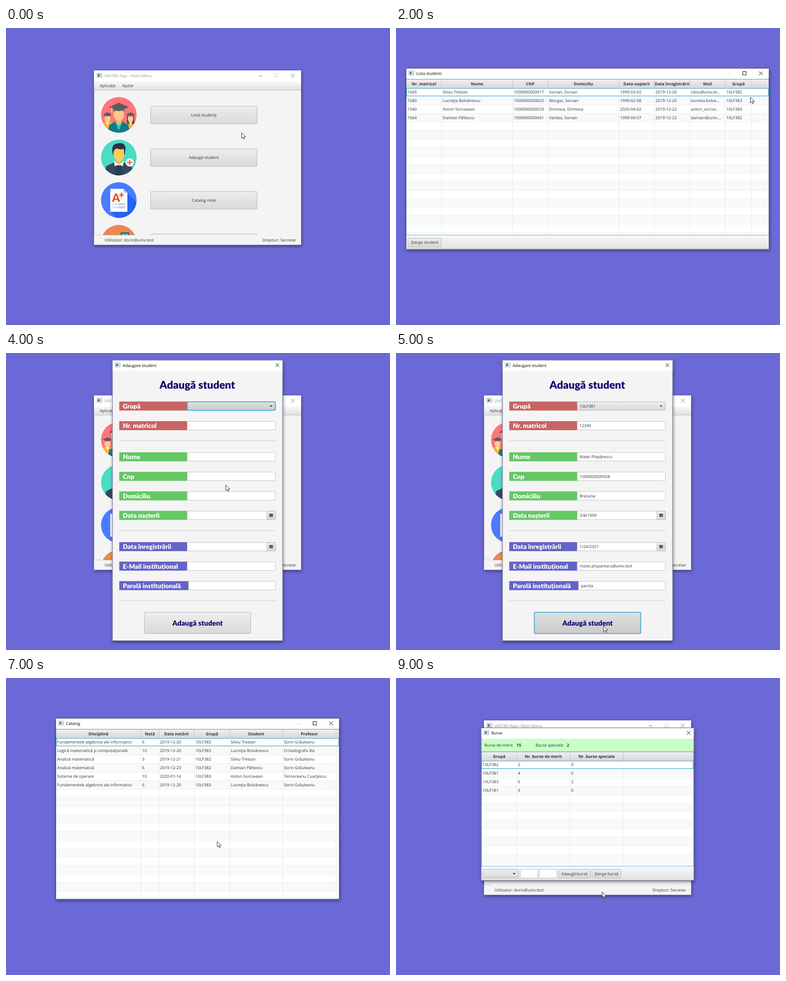
Recreate the animation shown at these times as an HTML page. Size 851 px wide and 658 px high, loop 10000 ms.

```html
<!DOCTYPE html>
<html lang="ro">
<head>
<meta charset="utf-8">
<title>Main Menu</title>
<style>
  html, body { margin: 0; width: 100%; height: 100%; overflow: hidden; background: #6b69d6; }
  svg { display: block; }
  text { font: 9px "Open Sans", "Noto Sans", sans-serif; fill: #333; text-rendering: geometricPrecision; white-space: pre; }
  .bold { font-weight: 700; }
  .mid { text-anchor: middle; }
  .end { text-anchor: end; }
  .lato { font-family: Lato, "Open Sans", sans-serif; font-weight: 900; }
  .label { font-size: 14.13px; fill: #fff; }
  .navy { fill: #10056e; }
  .shadow { filter: drop-shadow(1.5px 3px 3.5px rgba(0, 0, 0, .45)); }
</style>
</head>
<body>
<svg width="851" height="658" viewBox="0 0 851 658">
  <defs>
    <linearGradient id="button" x2="0" y2="1"><stop stop-color="#eeeeee"/><stop offset="1" stop-color="#d9d9d9"/></linearGradient>
    <linearGradient id="hover" x2="0" y2="1"><stop stop-color="#e0e0e0"/><stop offset="1" stop-color="#cacaca"/></linearGradient>
    <linearGradient id="bar" x2="0" y2="1"><stop stop-color="#f8f8f8"/><stop offset="1" stop-color="#e2e2e2"/></linearGradient>
    <linearGradient id="header" x2="0" y2="1"><stop stop-color="#f0f0f0"/><stop offset="1" stop-color="#d8d8d8"/></linearGradient>
    <clipPath id="viewport"><rect x="195" y="138" width="459" height="321"/></clipPath>
    <clipPath id="disc"><circle r="39.5"/></clipPath>
  </defs>
  <g id="stage"></g>
</svg>
<script>
const BLUE = '#1fa3d0';
const ROW = 18.85;

const rect = (x, y, w, h, fill, attrs = '') =>
  `<rect x="${x}" y="${y}" width="${w}" height="${h}" fill="${fill}" ${attrs}/>`;
const path = (d, fill, attrs = '') => `<path d="${d}" fill="${fill}" ${attrs}/>`;
const line = (d, color, width = 1) => path(d, 'none', `stroke="${color}" stroke-width="${width}"`);
const ellipse = (x, y, rx, ry, fill) => `<ellipse cx="${x}" cy="${y}" rx="${rx}" ry="${ry}" fill="${fill}"/>`;
const text = (x, y, s, cls = '', attrs = '') => `<text x="${x}" y="${y}" class="${cls}" ${attrs}>${s}</text>`;
const group = (attrs, ...parts) => `<g ${attrs}>${parts.join('')}</g>`;

function button(x, y, w, h, label, active = false, cls = '', size = 9) {
  const edge = active ? `stroke="${BLUE}" stroke-width="1.5"` : 'stroke="#b5b5b5"';
  return rect(x, y, w, h, `url(#${active ? 'hover' : 'button'})`, `rx="2" ${edge}`) +
    text(x + w / 2, y + h / 2 + size * .36, label, 'mid ' + cls, `style="font-size:${size}px"`);
}

const field = (x, y, w, h, value = '') =>
  rect(x, y, w, h, '#fff', 'rx="1" stroke="#c0c0c0"') + text(x + 5.5, y + h / 2 + 3.2, value);

const combo = (x, y, w, h, value, active) =>
  button(x, y, w, h, '', active) + text(x + 5.5, y + h / 2 + 3.2, value) +
  path(`M${x + w - 12.5} ${y + h / 2 - 1.5}h6l-3 3.5z`, '#333');

const cursor = (x, y) =>
  path('M0 0V12.5L3 9.8L5 14.3L7 13.4L5.1 9.1H9Z', '#fff', `stroke="#111" stroke-width=".9" transform="translate(${x} ${y})"`);

// Window frame; controls: 'full' shows minimise and maximise, 'close' only the cross.
function frame(x, y, right, bottom, title, { controls = 'close', active = true, min = '#000', max = '#000' }, ...body) {
  const ink = active ? '#000' : '#999';
  const cy = y + 11.5;
  const cross = right - (controls === 'full' ? 18.5 : 12);
  let s = group('class="shadow"', rect(x, y, right - x, bottom - y, '#f4f4f4'));
  s += rect(x, y, right - x, 24, '#fff');
  s += rect(x + 6.5, y + 6.5, 11, 9, '#eceef1', 'stroke="#9aa3ad" stroke-width=".9"');
  s += rect(x + 8.5, y + 8.5, 4, 5, active ? '#3a6ea8' : '#46607c') + rect(x + 13.5, y + 8.5, 2, 5, '#c3cad2');
  s += text(x + 23, y + 15.3, title, '', `style="fill:${ink}"`);
  if (controls === 'full') {
    s += line(`M${right - 94} ${cy + .5}h8`, min);
    s += rect(right - 58.5, cy - 4, 7.5, 7.5, 'none', `stroke="${max}"`);
  }
  s += line(`M${cross - 4} ${cy - 4}l8 8m0 -8l-8 8`, active ? '#000' : '#777');
  s += body.join('');
  return s + (active ? rect(x + .5, y + .5, right - x - 1, bottom - y - 1, 'none', 'stroke="#34345e" stroke-opacity=".75"') : '');
}

// edges: left edge of each column, followed by the right edge of the last one
function table(x, y, right, bottom, edges, titles, rows) {
  const first = y + 20;
  let s = rect(x, y, right - x, bottom - y, '#fff');
  for (let i = 0, top = first; top < bottom; top = first + ROW * ++i) {
    if (i % 2) s += rect(x, top, right - x, Math.min(ROW, bottom - top), '#f9f9f9');
    if (i) s += line(`M${x} ${top}H${right}`, '#ededed');
  }
  s += rect(x, y, right - x, 20, 'url(#header)') + line(`M${x} ${first}H${right}`, '#c8c8c8', .8);
  for (const edge of edges.slice(1)) {
    s += line(`M${edge} ${first}V${bottom}`, '#e8e8e8') + line(`M${edge} ${y + 1}V${first}`, '#c4c4c4');
  }
  s += rect(x + 1.5, first + 1, right - x - 3.5, 16.5, '#fff', `stroke="${BLUE}"`);
  titles.forEach((title, c) => s += text((edges[c] + edges[c + 1]) / 2, y + 14.3, title, 'mid bold'));
  rows.forEach((row, r) => row.split('|').forEach((cell, c) =>
    s += text(edges[c] + 2.6, first + 12.4 + r * ROW, cell)));
  return s + rect(x + .5, y + .5, right - x - 1, bottom - y - 1, 'none', `stroke="${BLUE}"`);
}

const cap = (x, y, k) => group(`transform="translate(${x} ${y}) scale(${k})"`,
  path('M-13 0V10Q0 5 13 10V0Z', '#777'), path('M-22 0L0 -10L22 0L0 9Z', '#5c5c5c'));

const icons = [
  ellipse(0, 0, 40, 40, '#ff7579') +
    path('M-40 40V20L-28 15H-20L-8 22V40Z', '#fbb034') + path('M40 40V20L30 15H21L8 22V40Z', '#fbb034') +
    path('M18 2H34V20H18Z', '#5a4a45') +
    path('M-29 14h8l-4 10z', '#fff') + path('M22 14h8l-4 10z', '#fff') +
    ellipse(-25, 8, 6.5, 9, '#fdc98f') + ellipse(26, 8, 6, 9, '#fdc98f') + cap(-25, -1, .48) + cap(26, -1, .48) +
    path('M-25 40L-21 22L-8 15H8L21 22L25 40Z', '#0f7c86') + path('M-8 15L0 35L8 15Z', '#2cc9b5') +
    path('M-6 8H6V17L0 24L-6 17Z', '#f3b47c') + ellipse(0, -1, 11.5, 14, '#fdc98f') +
    cap(0, -17, 1) + line('M-15.5 -17V-5', '#fff', 1.2) + rect(-17, -6, 3, 6, '#fb9a34'),
  ellipse(0, 0, 40, 40, '#4bdcc4') +
    path('M-33 40L-28 19L-9 10H9L28 19L33 40Z', '#34495e') + path('M-11 7L0 15L11 7L9 19L0 17L-9 19Z', '#fff') +
    path('M-6 0H6V9L0 16L-6 9Z', '#f0b64a') + path('M-5 17H5L9 40H-9Z', '#2b3d50') +
    path('M-14 -10Q-17 -30 -4 -31Q14 -35 15 -20L13 -6H-12Z', '#263445') +
    path('M-12 -12Q-9 -20 -4 -20Q6 -16 11 -20L12 -8Q11 8 0 10Q-10 8 -12 -12Z', '#fdcb58') +
    ellipse(24, 11, 9, 9, '#fff') + line('M18 11H30M24 5V17', '#ff6464', 3),
  ellipse(0, 0, 40, 40, '#4a7bff') + path('M19 -16L42 8V42H-3L-19 26Z', '#2563f0') +
    path('M-19 -25H10L19 -16V26H-19Z', '#fafbfd') + path('M10 -25V-16H19Z', '#c4cfe0') +
    text(-15, 4, 'A', 'lato', 'style="font-size:25px;fill:#f4511e"') + line('M1 -11.5H11M6 -16.5V-6.5', '#f4511e', 2.8) +
    rect(-14, 7, 28, 4, '#dde3ec') + rect(-14, 14, 28, 4, '#dde3ec') + rect(0, 7, 14, 4, '#c2ccdb') + rect(0, 14, 14, 4, '#c2ccdb'),
  ellipse(0, 0, 40, 40, '#e98a52') +
    rect(4, -23, 19, 38, '#485a68', 'rx="1.5"') + rect(6.5, -20, 14, 7, '#3fc9b8') +
    [0, 1, 2].map(r => rect(7, -9 + r * 7, 5, 4, '#e9eef2') + rect(15, -9 + r * 7, 5, 4, r ? '#fbc94b' : '#4a9bff')).join('') +
    group('transform="rotate(-38)"', rect(-23, -14, 30, 17, '#249070'), rect(-21, -11, 30, 17, '#35b68d'), ellipse(-6, -2, 5, 5, '#249070')) +
    ellipse(0, 10, 9, 5, '#fbc94b') + ellipse(0, 15, 9, 5, '#e5a832') + ellipse(-12, 16, 8, 5, '#fbc94b')
];

function mainMenu({ active = false, scroll = 0, pressed = -1 } = {}) {
  const items = ['Listă studenți', 'Adaugă student', 'Catalog note', 'Burse'].map((label, i) => {
    const y = 192.5 + 94.4 * i;
    return group(`transform="translate(250 ${y})" clip-path="url(#disc)"`, icons[i]) +
      button(320.5, y - 19.3, 236, 39, label, i === pressed);
  });
  return frame(195, 94, 654, 480.5, 'UNITBV App - Main Menu',
    { controls: 'full', active, min: active ? '#000' : '#777', max: '#d4d4d4' },
    rect(195, 118, 459, 19.5, 'url(#bar)'), line('M195 137.5H654', '#b8b8b8'),
    text(207.5, 131.3, 'Aplicație'), text(257.5, 131.3, 'Ajutor'),
    group('clip-path="url(#viewport)"', group(`transform="translate(0 ${-scroll})"`, ...items)),
    line('M195.5 138V458.5H210.5', '#c6c6c6'),
    text(218.5, 473.3, 'Utilizator: dorin@univ.test'), text(643, 473.3, 'Drepturi: Secretar', 'end'));
}

const studentList = () => frame(22, 89, 827, 490.5, 'Lista studenti', { controls: 'full', min: '#ccc' },
  table(22, 113, 827, 459.5, [23, 101, 258.3, 336.6, 494, 572.5, 651, 729.5, 788.5],
    ['Nr. matricol', 'Nume', 'CNP', 'Domiciliu', 'Data nașterii', 'Data înregistrării', 'Mail', 'Grupă'], [
      '1665|Silviu Trestan|1000000000017|Sorvan, Sorvan|1999-03-02|2019-12-20|silviu@univ.te...|10LF382',
      '1680|Lucreția Bolvănescu|1000000000025|Murgaz, Sorvan|1999-02-08|2019-12-20|lucretia.bolva...|10LF383',
      '1940|Anton Sorcovean|1000000000033|Drimova, Drimova|2020-04-02|2019-12-22|anton_sorcov...|10LF383',
      '1664|Damian Păltescu|1000000000041|Vardea, Sorvan|1999-09-07|2019-12-22|damian@univ....|10LF382'
    ]),
  rect(22, 459.5, 805, 31, 'url(#bar)'), button(26.5, 465.5, 74, 19.5, 'Șterge student'));

const catalog = () => frame(110, 89, 739, 490.5, 'Catalog', { controls: 'full', min: '#ccc' },
  table(110, 113, 739, 490.5, [110.7, 299.2, 338.4, 417, 495.5, 613.3, 731.5],
    ['Disciplină', 'Notă', 'Data notării', 'Grupă', 'Student', 'Profesor'], [
      'Fundamentele algebrice ale informaticii|6|2019-12-20|10LF382|Silviu Trestan|Sorin Grâuleanu',
      'Logică matematică și computațională|10|2019-12-20|10LF383|Lucreția Bolvănescu|Cristalografu Ilie',
      'Analiză matematică|3|2019-12-21|10LF382|Silviu Trestan|Sorin Grâuleanu',
      'Analiză matematică|6|2019-12-23|10LF382|Damian Păltescu|Sorin Grâuleanu',
      'Sisteme de operare|10|2020-01-14|10LF383|Anton Sorcovean|Tensoreanu Cuarțescu',
      'Fundamentele algebrice ale informaticii|6|2019-12-20|10LF383|Lucreția Bolvănescu|Sorin Grâuleanu'
    ]));

const scholarships = () => frame(188.5, 110, 660.5, 449, 'Burse', {},
  rect(188.5, 134.5, 472, 29, '#c8ffc8'),
  text(196, 152.4, 'Burse de merit:'), text(267, 152.4, '15', 'bold'),
  text(309.5, 152.4, 'Burse speciale:'), text(378.5, 152.4, '2', 'bold'),
  table(188.5, 163, 660.5, 417.5, [189.5, 267.5, 385.5, 503.5],
    ['Grupă', 'Nr. burse de merit', 'Nr. burse speciale'],
    ['10LF382|2|0', '10LF381|4|0', '10LF383|6|2', '10LF181|3|0']),
  rect(188.5, 417.5, 472, 31.5, 'url(#bar)'),
  combo(193.5, 424, 78, 19, '', false), field(275.5, 424, 38.5, 19), field(317.5, 424, 39, 19),
  button(360.5, 424, 70, 19, 'Adaugă bursă'), button(434, 424, 64.5, 19, 'Șterge bursă'));

function addStudent(filled) {
  const RED = '#c86464', GREEN = '#64c864', VIOLET = '#6464c8';
  const fields = [
    [107.5, RED, 'Grupă', '10LF381', 'combo'],
    [151, RED, 'Nr. matricol', '12345'],
    [220, GREEN, 'Nume', 'Matei Plopărescu'],
    [263.3, GREEN, 'Cnp', '1000000000058'],
    [306.5, GREEN, 'Domiciliu', 'Brezuna'],
    [349.7, GREEN, 'Data nașterii', '3/8/1999', 'date'],
    [419, VIOLET, 'Data înregistrării', '1/24/2021', 'date'],
    [462.2, VIOLET, 'E-Mail instituțional', 'matei.ploparescu@univ.test'],
    [505.4, VIOLET, 'Parolă instituțională', 'parola']
  ].map(([y, color, label, sample, kind], i) => {
    const value = filled ? sample : '';
    const x = i === 8 ? 404.5 : 401.5;
    let s = rect(251, y, x - 251, 20, color) + text(259, y + 15.3, label, 'lato label');
    s += kind === 'combo' ? combo(x, y + .5, 195.5, 19, value, !filled) : field(x, y + .5, 597 - x, 19, value);
    if (kind === 'date') {
      s += button(578, y + .5, 19, 19, '') + rect(583.5, y + 6.5, 8, 7, '#444') +
        line(`M584.5 ${y + 9.5}h6m-6 2h6`, '#aaa', .7);
    }
    return s;
  });
  return frame(235.5, 15.5, 613.5, 638, 'Adaugare student', {},
    text(424, 79, 'Adaugă student', 'mid lato navy', 'style="font-size:23.55px"'),
    ...fields, line('M251 194.5H597M251 393.5H597M251 548.8H597', '#c9c9c9'),
    button(306.5, 574.5, 236, 47, 'Adaugă student', filled, 'lato navy', 15.7));
}

const halo = '<circle cx="468" cy="361.5" r="10" fill="#f6c544" fill-opacity=".62"/>';

// One scene per second
const scenes = [
  mainMenu() + cursor(522, 232),
  mainMenu() + cursor(442, 189),
  studentList() + cursor(785.5, 153.5),
  mainMenu({ pressed: 1 }) + cursor(487, 292.5),
  mainMenu() + addStudent(false) + cursor(487, 292.5),
  mainMenu() + addStudent(true) + cursor(460, 604.5),
  mainMenu({ active: true, scroll: 23.7, pressed: 2 }) + halo + cursor(468, 362),
  catalog() + cursor(468, 362),
  mainMenu({ active: true, scroll: 71, pressed: 3 }) + cursor(457, 405),
  mainMenu({ scroll: 71, pressed: 3 }) + scholarships() + cursor(457, 474)
];

const stage = document.getElementById('stage');
let shown = -1;
function tick() {
  const index = Math.floor(performance.now() / 1000) % scenes.length;
  if (index !== shown) stage.innerHTML = scenes[shown = index];
  requestAnimationFrame(tick);
}
tick();
</script>
</body>
</html>
```
